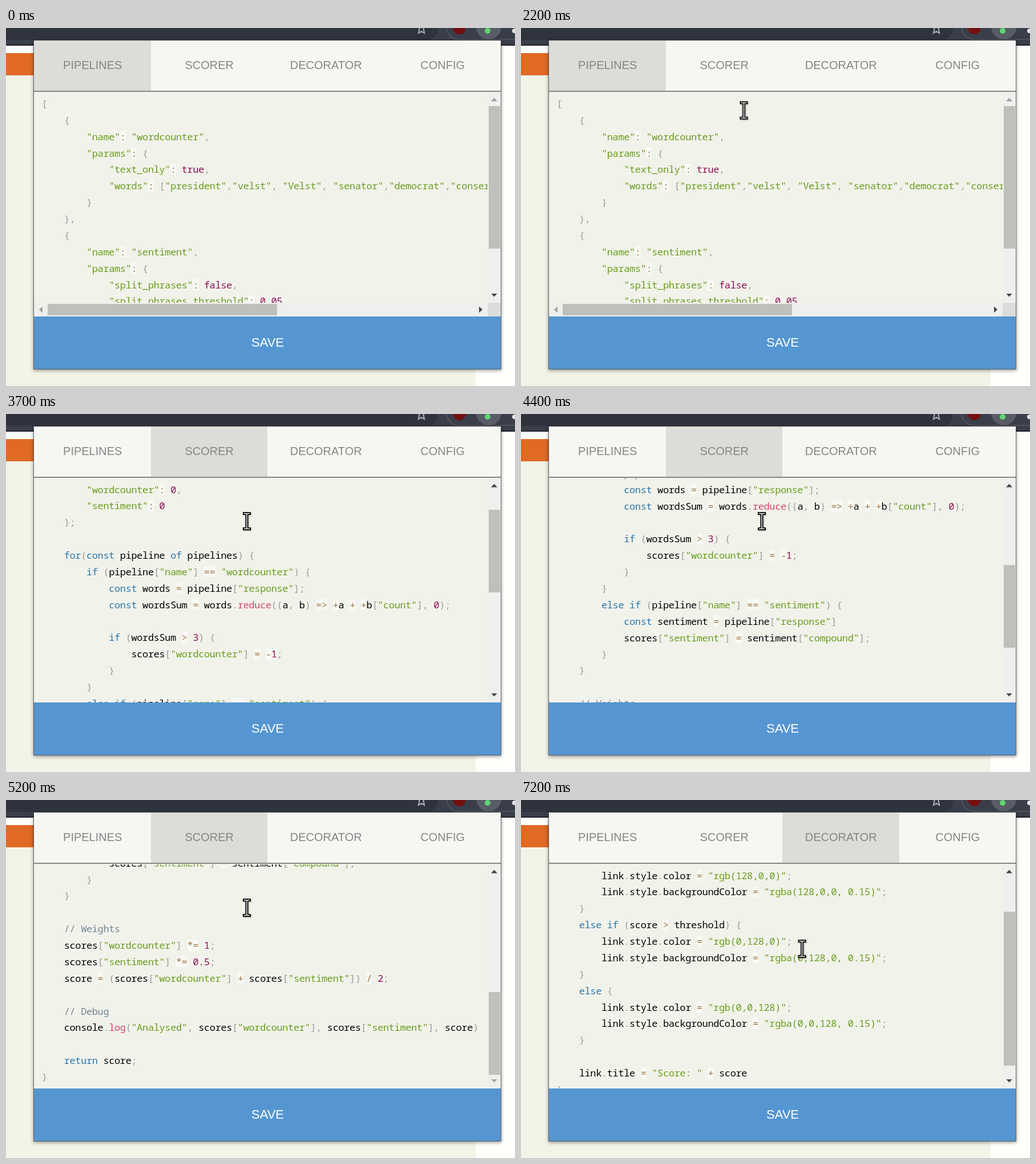
Animation of 892x628 px, one loop 8000 ms. Source, as an HTML page:

```html
<!DOCTYPE html>
<html lang="en">
<head>
<meta charset="utf-8">
<title>Pipeline editor</title>
<style>
  :root { --tab: #f6f7f3; --on: #dcddd9; --dim: #a0a19e; --dark: #454545; }
  html, body { margin: 0; width: 100%; height: 100%; overflow: hidden; }
  body { position: relative; background: #fffffc; font-family: "Liberation Sans", Arial, sans-serif; }
  div, svg, .thumb, .arrow, .corner { position: absolute; }

  .page { left: 0; top: 44px; width: 823px; height: 584px; background: #f2f4e7; }
  .banner { left: 0; top: 43.5px; width: 60px; height: 39px; background: #e06a24; }
  .bar { left: 0; top: 0; }
  .popup { left: 49px; top: 22px; width: 818px; height: 576px; background: #f1f2ea;
    box-shadow: 0 0 0 1px #4a4d55cc, 0 2px 6px 1px rgba(0,0,0,.4); }

  .tabs { inset: 0 0 auto; height: 88px; display: flex; background: var(--tab); border-bottom: 2.5px solid #868784; }
  .tabs span { flex: 1; text-align: center; text-indent: 1px; font-size: 20px; line-height: 86px; color: #858585; }
  .save { left: 0; top: 483.5px; width: 818px; height: 92.5px; background: #5596d2; color: #fff;
    font-size: 22px; line-height: 92px; text-align: center; text-indent: 1px; }

  .pane { left: 0; top: 90.5px; width: 818px; height: 393px; overflow: hidden; }
  .view { left: 0; top: 0; width: 795px; height: 100%; overflow: hidden; }
  pre { margin: 0; padding: 6.4px 0 0 13.5px; color: #000; text-shadow: 0 1px #fff;
    font: 17px/28.87px "Noto Sans Mono", "DejaVu Sans Mono", monospace; letter-spacing: -.39px; }
  pre i { font-style: normal; }
  .com { color: slategray; }
  .str { color: #66991a; }
  .key { color: #2872a4; }
  .num { color: #880c50; }
  .fn { color: #d04462; }
  .pun { color: #999; }
  .op { color: #9a6e3a; background: linear-gradient(#fff8, #fff8) center / 100% 20px no-repeat; }

  .track { right: 0; top: 0; width: 23px; height: 100%; background: #eff0ed; }
  .thumb { left: 2px; top: 24.5px; width: 20px; background: #bfc0bc; }
  .arrow { left: 6px; width: 11px; height: 6px; background: var(--dark); }
  .up { top: 10px; clip-path: polygon(50% 0, 100% 100%, 0 100%); }
  .down { bottom: 10px; clip-path: polygon(0 0, 100% 0, 50% 100%); }
  #pipe .track { height: 369px; }
  #pipe .view { height: 369px; }
  .hbar { left: 0; top: 369px; width: 795px; height: 24px; background: #eff0ed; }
  .hbar .thumb { left: 24px; top: 2px; width: 402px; height: 20px; }
  .hbar .arrow { top: 7px; width: 6px; height: 11px; }
  .left { clip-path: polygon(0 50%, 100% 0, 100% 100%); }
  .hbar .left { left: 9px; background: var(--dim); }
  .right { clip-path: polygon(0 0, 100% 50%, 0 100%); }
  .hbar .right { left: 780px; }
  .corner { right: 0; bottom: 0; width: 23px; height: 24px; background: #dcddda; }
  #pipe .track .thumb { height: 250px; }
  #score .track .thumb { height: 145px; }
  #deco .track .thumb { height: 270px; }
  .cursor { left: -10px; top: -18px; filter: drop-shadow(1px 1px 1px #0005); }

  /* every track shares one 8 s clock; changes are held unless steps() says otherwise */
  .tabs span, .pane, pre, .track .thumb, .track .arrow, .cursor {
    animation: 8s step-end -20ms infinite; }

  .tabs span:nth-child(1) { animation-name: tab-pipe; }
  .tabs span:nth-child(2) { animation-name: tab-score; }
  .tabs span:nth-child(3) { animation-name: tab-deco; }
  @keyframes tab-pipe { 0% { background: var(--on); } 33.75%, 100% { background: var(--tab); } }
  @keyframes tab-score {
    0% { background: var(--tab); }
    10% { background: var(--tab); animation-timing-function: steps(3); }
    13.75% { background: var(--on); }
    16.25% { background: var(--tab); }
    31.25% { background: var(--on); }
    75%, 100% { background: var(--tab); }
  }
  @keyframes tab-deco { 0% { background: var(--tab); } 73.75%, 100% { background: var(--on); } }

  #pipe { animation-name: show-pipe; }
  #score { animation-name: show-score; }
  #deco { animation-name: show-deco; }
  @keyframes show-pipe { 0% { visibility: visible; } 33.75%, 100% { visibility: hidden; } }
  @keyframes show-score { 0% { visibility: hidden; } 33.75% { visibility: visible; } 75%, 100% { visibility: hidden; } }
  @keyframes show-deco { 0% { visibility: hidden; } 75%, 100% { visibility: visible; } }

  #pipe pre { animation-name: text-pipe; }
  #pipe .track .thumb { animation-name: thumb-pipe; }
  @keyframes text-pipe {
    0% { transform: none; }
    18.75% { transform: translateY(-86.6px); }
    21.25% { transform: translateY(-105px); }
    23.75% { transform: translateY(-70px); animation-timing-function: steps(3); }
    27.5%, 100% { transform: translateY(0); }
  }
  @keyframes thumb-pipe {
    0% { transform: none; }
    18.75% { transform: translateY(59px); }
    21.25% { transform: translateY(71px); }
    23.75% { transform: translateY(47px); animation-timing-function: steps(3); }
    27.5%, 100% { transform: translateY(0); }
  }

  /* the text trails the scrollbar while the wheel turns */
  #score pre { animation-name: text-score; }
  #score .track .thumb { animation-name: thumb-score; }
  @keyframes text-score {
    0% { transform: none; }
    46.25% { transform: translateY(-86.6px); }
    50% { transform: translateY(-130px); animation-timing-function: steps(2); }
    52.5% { transform: translateY(-173.2px); }
    55% { transform: translateY(-259.8px); }
    57.5% { transform: translateY(-346.4px); }
    62.5% { transform: translateY(-433px); animation-timing-function: steps(2); }
    65%, 100% { transform: translateY(-542px); }
  }
  @keyframes thumb-score {
    0% { transform: none; }
    46.25% { transform: translateY(31px); }
    50% { transform: translateY(64px); }
    52.5% { transform: translateY(96px); }
    55% { transform: translateY(128px); }
    60% { transform: translateY(159px); }
    63.75%, 100% { transform: translateY(200px); }
  }

  #deco pre { animation-name: text-deco; }
  #deco .track .thumb { animation-name: thumb-deco; }
  @keyframes text-deco { 0% { transform: none; } 90%, 100% { transform: translateY(-86.6px); } }
  @keyframes thumb-deco { 0% { transform: none; } 90%, 100% { transform: translateY(59px); } }

  .track .up { animation-name: up; }
  .track .down { animation-name: down; }
  @keyframes up {
    0%, 27.5%, 75% { background: var(--dim); }
    18.75%, 46.25%, 90%, 100% { background: var(--dark); }
  }
  @keyframes down {
    0%, 23.75%, 75%, 100% { background: var(--dark); }
    21.25%, 65% { background: var(--dim); }
  }

  .cursor { animation-name: cursor; }
  @keyframes cursor {
    0% { opacity: 0; transform: translate(352px, 84px); }
    10% { opacity: 1; transform: translate(352px, 84px); animation-timing-function: steps(3); }
    13.75% { opacity: 1; transform: translate(362.5px, 52px); }
    16.25% { transform: translate(362.5px, 52px); animation-timing-function: steps(2); }
    18.75% { transform: translate(390.5px, 142px); }
    21.25% { transform: translate(390.5px, 144.5px); }
    30% { transform: translate(376px, 84px); }
    31.25% { transform: translate(364px, 62px); }
    33.75% { transform: translate(364px, 62px); animation-timing-function: steps(5); }
    40% { transform: translate(422px, 187px); }
    42.5% { transform: translate(422px, 188px); }
    62.5% { transform: translate(422px, 189px); }
    66.25% { transform: translate(424px, 184px); }
    67.5% { transform: translate(430px, 170px); }
    70% { transform: translate(442px, 136px); animation-timing-function: steps(3); }
    73.75% { transform: translate(492px, 62px); }
    75% { transform: translate(492px, 62px); animation-timing-function: steps(3); }
    78.75% { transform: translate(493px, 262px); }
    81.25% { transform: translate(493px, 261px); }
    83.75%, 100% { opacity: 1; transform: translate(492.5px, 261px); }
  }
</style>
</head>
<body>
<div class="page"></div>
<div class="banner"></div>
<svg class="bar" width="892" height="31">
  <rect width="892" height="31" fill="#3a3e4a"/>
  <rect x="-30" y="-20" width="787" height="41" rx="20" fill="#2f333e"/>
  <rect y="29" width="892" height="2" fill="#1f222a"/>
  <path d="M720 -4l4.6 5-1.8 8 5.2-3.2 5.2 3.2-1.8-8 4.6-5" fill="none" stroke="#a9acb3" stroke-width="2"/>
  <rect x="772" y="-26" width="160" height="46" rx="22" fill="none" stroke="#555963" stroke-width="1.5"/>
  <circle cx="794.5" cy="0" r="11" fill="#74100f"/>
  <circle cx="846" cy="-2" r="22" fill="#585c66"/>
  <circle cx="844" cy="5" r="5" fill="#5fd672"/>
  <circle cx="891" cy="5" r="4" fill="#e4e5e8"/>
</svg>

<div class="popup">
  <div class="tabs"><span>PIPELINES</span><span>SCORER</span><span>DECORATOR</span><span>CONFIG</span></div>

  <div class="pane" id="pipe">
    <div class="view"><pre>
[
    {
        "name": "wordcounter",
        "params": {
            "text_only": true,
            "words": ["president","velst", "Velst", "senator","democrat","conservative"]
        }
    },
    {
        "name": "sentiment",
        "params": {
            "split_phrases": false,
            "split_phrases_threshold": 0.05
        }
    }
]</pre></div>
    <div class="hbar"><i class="arrow left"></i><i class="thumb"></i><i class="arrow right"></i></div>
    <i class="corner"></i>
  </div>

  <div class="pane" id="score">
    <div class="view"><pre>
function(pipelines) {
    let score = 0;
    let scores = {
        "wordcounter": 0,
        "sentiment": 0
    };

    for(const pipeline of pipelines) {
        if (pipeline["name"] == "wordcounter") {
            const words = pipeline["response"];
            const wordsSum = words.reduce((a, b) => +a + +b["count"], 0);

            if (wordsSum > 3) {
                scores["wordcounter"] = -1;
            }
        }
        else if (pipeline["name"] == "sentiment") {
            const sentiment = pipeline["response"]
            scores["sentiment"] = sentiment["compound"];
        }
    }

    // Weights
    scores["wordcounter"] *= 1;
    scores["sentiment"] *= 0.5;
    score = (scores["wordcounter"] + scores["sentiment"]) / 2;

    // Debug
    console.log("Analysed", scores["wordcounter"], scores["sentiment"], score)

    return score;
}</pre></div>
  </div>

  <div class="pane" id="deco">
    <div class="view"><pre>
function(link, score) {
    const threshold = 0.2;
    if (score &lt; -threshold) {
        link.style.color = "rgb(128,0,0)";
        link.style.backgroundColor = "rgba(128,0,0, 0.15)";
    }
    else if (score > threshold) {
        link.style.color = "rgb(0,128,0)";
        link.style.backgroundColor = "rgba(0,128,0, 0.15)";
    }
    else {
        link.style.color = "rgb(0,0,128)";
        link.style.backgroundColor = "rgba(0,0,128, 0.15)";
    }

    link.title = "Score: " + score
}</pre></div>
  </div>

  <div class="save">SAVE</div>
</div>

<svg class="cursor" width="20" height="36" fill="none" stroke-linecap="square">
  <path id="beam" d="M5.5 4.5h3.2l1.3 1.3 1.3-1.3h3.2M10 6v24M5.5 31.5h3.2l1.3-1.3 1.3 1.3h3.2" stroke-width="5" stroke="#000"/>
  <path d="M5.5 4.5h3.2l1.3 1.3 1.3-1.3h3.2M10 6v24M5.5 31.5h3.2l1.3-1.3 1.3 1.3h3.2" stroke-width="1.4" stroke="#fff"/>
</svg>

<script>
  const token = new RegExp([
    '(?<com>//.*)',
    '(?<str>"[^"]*")',
    '\\b(?<key>const|let|for|of|if|else|return|function)\\b',
    '\\b(?<num>true|false|\\d+(?:\\.\\d+)?)\\b',
    '(?<fn>\\w+)(?=\\()',
    '(?<op>[=*]=|=>|[=+\\-/<>:])',
    '(?<pun>[\\[\\]{}(),;.])'
  ].join('|'), 'g');

  const paint = (text, ...rest) => {
    const groups = rest.at(-1);
    const kind = Object.keys(groups).find(k => groups[k]);
    return `<i class="${kind}">${text.replace('<', '&lt;')}</i>`;
  };

  for (const pre of document.querySelectorAll('pre'))
    pre.innerHTML = pre.textContent.replace(token, paint);

  for (const pane of document.querySelectorAll('.pane'))
    pane.insertAdjacentHTML('beforeend',
      '<div class="track"><i class="arrow up"></i><i class="thumb"></i><i class="arrow down"></i></div>');
</script>
</body>
</html>
```
